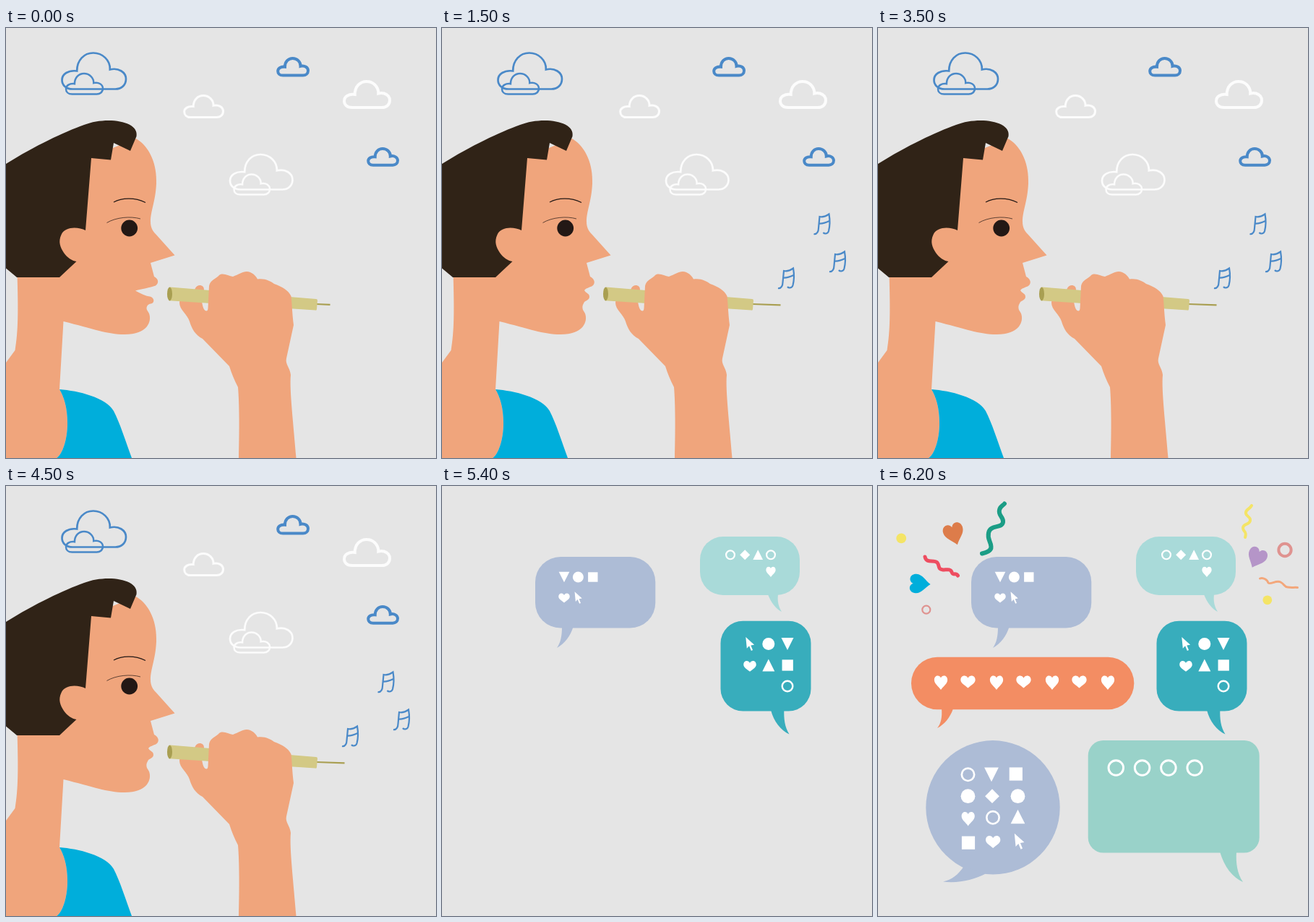
Write an HTML page with a canvas that moves like this. It is 595x595 px and loops after 6400 ms.

```html
<!DOCTYPE html>
<html lang="en">
<head>
<meta charset="utf-8">
<title>Blowing tunes and chat bubbles</title>
<style>
html, body { margin: 0; width: 100%; height: 100%; overflow: hidden; background: #e5e5e5; }
canvas { display: block; width: 595px; height: 595px; }
</style>
</head>
<body>
<canvas id="stage" width="595" height="595"></canvas>
<script>
const ctx = document.getElementById('stage').getContext('2d');
const TAU = Math.PI * 2;
const LOOP = 6400, BEAT = 500, CHAT_START = 5000, CHAT_STEP = 200;
const SKIN = '#f0a57c', HAIR = '#302317', BLUE = '#4a89c8', WHITE = '#fcfcfc';
const CYAN = '#00aedb', PIPE = '#d3c985', PIPE_DARK = '#a99f52', INK = '#231815';
const PERIWINKLE = '#adbcd6', YELLOW = '#f4e466', PINK = '#df9390';

function fill(path, color) {
  ctx.fillStyle = color;
  ctx.fill(new Path2D(path));
}

function stroke(path, color, width) {
  ctx.strokeStyle = color;
  ctx.lineWidth = width;
  ctx.stroke(path instanceof Path2D ? path : new Path2D(path));
}

function disc(x, y, r, color) {
  ctx.fillStyle = color;
  ctx.beginPath();
  ctx.arc(x, y, r, 0, TAU);
  ctx.fill();
}

function ring(x, y, outer, width, color) {
  ctx.strokeStyle = color;
  ctx.lineWidth = width;
  ctx.beginPath();
  ctx.arc(x, y, (outer - width) / 2, 0, TAU);
  ctx.stroke();
}

// Sky
const CLOUD = new Path2D('M15 50C5 50 0 44 0 37.5C0 29 9 23.500 21 25C21 10 31 0 44 0C57 0 68 10 67.500 23C80 20 90 27 90 36C90 45 83 50 75 50Z');

function cloud(x, y, w, h, color, width) {
  const outline = new Path2D();
  outline.addPath(CLOUD, new DOMMatrix([w / 90, 0, 0, h / 50, x, y]));
  stroke(outline, color, width);
}

function drawSky() {
  cloud(77.5, 34.5, 88.5, 50, BLUE, 2.7);
  cloud(83, 63, 51, 28.5, BLUE, 2.5);
  cloud(310, 175, 86.5, 48.5, WHITE, 2.7);
  cloud(315.5, 202.5, 49.5, 28, WHITE, 2.5);
  cloud(376.2, 42, 41.8, 23.5, BLUE, 4);
  cloud(501.2, 167, 40.8, 22.7, BLUE, 4);
  cloud(246.7, 93.6, 53.8, 30, WHITE, 3);
  cloud(468, 74, 63, 36, WHITE, 4);
}

// Person
const MOUTH_OPEN = 'C211 347 212 353 207 356.500C199 359.500 188 361 179 363.500C186 367 193 371 200 371.800C206 374 205.500 381 200.500 381.500C196 382 193.500 386 195 390';
const MOUTH_SHUT = 'C211 347 213 353 208 357C204 359 199 360 197 363C199 367 204 367 204 372C204 377 197 377 196 381C194 384 194 387 195 390';

function drawHead(blowing) {
  fill('M60 250L118 178L180 153C200 165 209 190 208 215C207 240 200 253 200 268C200 276 203 281 207 285L233.500 314.500L200 325L205 344' +
    (blowing ? MOUTH_SHUT : MOUTH_OPEN) +
    'L198 395C202 406 196 424 164 424C140 424 120 416 79.500 406L74 500C80 510 85 525 85 547C85 570 78 590 70 595H0V463L12.500 446C17 420 17 390 15.500 340Z', SKIN);
  fill('M74 500C100 502 138 511 149 530C157 545 166 573 174 595H70C78 590 85 570 85 547C85 525 80 510 74 500Z', CYAN);
  fill('M0 188C40 163 80 144 108 134C138 122 185 128 180.500 150L172 170L149 159L145 182.500L118 180L110 280C100 275 82 274 76.500 286C72 296 75 303 80 311C85 318 91 322 97.500 323L74 345H15L0 332.500Z', HAIR);
  disc(170.7, 277, 11.4, INK);
  stroke('M149 241C160 235 178 234 193 241.500', INK, 1.2);
  stroke('M139.500 269.500C152 262 172 260 186 264', INK, .7);
}

function drawHand(blowing) {
  fill('M241 372L256 372L262 360C265 354 274 355 274 362L271 378C272 386 274 391 277 392L280 420L254 406C251 396 240 390 240 380Z', SKIN);
  stroke(`M429 382L${blowing ? 468.5 : 448.5} ${blowing ? 383.3 : 382.9}`, PIPE_DARK, 2.2);
  fill('M227 358.500L429 375Q431 375.200 431 377L430 389Q430 391 428 390.600L226.500 377.300Z', PIPE);
  ctx.fillStyle = PIPE_DARK;
  ctx.beginPath();
  ctx.ellipse(226.5, 367.9, 3.5, 9.5, 0, 0, TAU);
  ctx.fill();
  fill('M281 357C282 349 292 346 295 342C300 338 308 343 314 344C322 341 327 337 333 337C340 337 346 343 348 347.500C358 346 366 350 371 354C382 358 391 363 394.500 371C396 385 396 395 398 411L388 457C386 465 393 470 394 480C392 500 398 550 401.500 595H322C323 560 323 520 321 497C316 487 312 478 309 468L272 430C262 425 257 416 254 406L274 390Q279 394 279.500 388Z', SKIN);
}

function drawNotes() {
  for (const [dx, dy] of [[0, 0], [21.5, 52], [-49.5, 75]]) {
    ctx.save();
    ctx.translate(dx, dy);
    stroke('M514.500 285C519 286 521 281 521 277L522.500 261C527 262 532 260 535.500 257.500C537 266 536.500 275 535 281C533.500 285.500 529 285 527.500 283M521.500 270.500C527 271 532 269 536 267', BLUE, 2.2);
    ctx.restore();
  }
}

// Icons fit a unit box centred on the origin
const ICONS = {
  square: 'M-.5-.5H.5V.5H-.5Z',
  diamond: 'M0-.5L.5 0L0 .5L-.5 0Z',
  up: 'M0-.5L.5 .5H-.5Z',
  down: 'M-.5-.5H.5L0 .5Z',
  heart: 'M0 .42C-.2 .25-.5 .1-.5-.13C-.5-.46-.13-.52 0-.26C.13-.52 .5-.46 .5-.13C.5 .1 .2 .25 0 .42Z',
  longHeart: 'M0 .55C-.18 .28-.5 .1-.5-.2C-.5-.57-.1-.62 0-.35C.1-.62 .5-.57 .5-.2C.5 .1 .18 .28 0 .55Z',
  arrow: 'M-.3-.5L-.22 .33L-.05 .15L.1 .5L.21 .45L.07 .11L.32 .06Z'
};

function icon(kind, x, y, size, color = '#fff', angle = 0) {
  if (kind === 'dot') return disc(x, y, size / 2, color);
  if (kind === 'ring') return ring(x, y, size, 1 + size / 12, color);
  ctx.save();
  ctx.translate(x, y);
  ctx.rotate(angle);
  ctx.scale(size, size);
  fill(ICONS[kind], color);
  ctx.restore();
}

function panel(x, y, w, h, r, color, tail) {
  ctx.fillStyle = color;
  ctx.beginPath();
  ctx.roundRect(x, y, w, h, r);
  ctx.fill();
  fill(tail, color);
}

const chatSteps = [
  () => {
    panel(357, 70, 138, 81, 32, '#a9dad9', 'M451 150C455 161 463 171 470 174C465 166 464 158 465 150Z');
    icon('ring', 399, 95.3, 14);
    icon('diamond', 419.2, 95.3, 14);
    icon('up', 437.2, 95.2, 13.7);
    icon('ring', 455, 95.3, 14);
    icon('longHeart', 455, 118.7, 13.3);
  },
  () => {
    panel(129, 98, 166.3, 98.5, 35, PERIWINKLE, 'M166 195C166 208 164 217 159 224C169 219 178 207 181.500 195Z');
    icon('down', 169, 126, 14.7);
    icon('dot', 188.4, 126, 15);
    icon('square', 208.8, 126, 13.4);
    icon('heart', 169, 155, 15.5);
    icon('arrow', 188.5, 154.5, 16.5);
  },
  () => {
    panel(385.5, 186.7, 125, 124.8, 31, '#38adbc', 'M455 310C459 326 469 338 480.500 343.500C474 333 473 322 473.300 310Z');
    icon('arrow', 426, 218.5, 19);
    icon('dot', 451.8, 218.5, 17);
    icon('down', 478, 218.5, 17);
    icon('heart', 426, 249.5, 17.5);
    icon('up', 451.8, 248, 17);
    icon('square', 478.2, 248, 15.3);
    icon('ring', 478, 277, 17);
  },
  () => {
    panel(46, 236.7, 308.3, 72.5, 36, '#f38d63', 'M88 308C89 320 87 329 82 335C92 330 100 320 104 308Z');
    for (let i = 0; i < 7; i++) {
      const long = i % 2 === 0;
      icon(long ? 'longHeart' : 'heart', 87 + i * 38.5 - (long ? 0 : 1), long ? 272 : 271, long ? 18.3 : 20.3);
    }
  },
  () => {
    panel(290.7, 352, 237, 155.5, 21, '#99d2c9', 'M473 506C479 527 491 542 505 548C497 536 495 522 496 506Z');
    for (let i = 0; i < 4; i++) icon('ring', 329.3 + i * 36.3, 390, 23.5);
  },
  () => {
    disc(159, 444.8, 92.7, PERIWINKLE);
    fill('M119 526C111 538 102 545 90 547.500C112 550 132 545 149 536.500Z', PERIWINKLE);
    icon('ring', 124.5, 399.3, 20);
    icon('down', 157, 399.3, 19.8);
    icon('square', 190.8, 398.5, 18.2);
    icon('dot', 124.5, 429.2, 19.8);
    icon('diamond', 158, 429.2, 19.8);
    icon('dot', 193.5, 429.2, 19.8);
    icon('longHeart', 124.7, 460.5, 18.2);
    icon('ring', 159, 458.8, 20);
    icon('up', 193.5, 457.5, 19.6);
    icon('square', 125, 493.7, 18.2);
    icon('heart', 159.2, 492.5, 20.3);
    icon('arrow', 195.4, 491.7, 22);
  },
  () => {
    disc(32.2, 72.4, 6.9, YELLOW);
    disc(538.8, 157.8, 6.4, YELLOW);
    ring(66.8, 171.2, 13.2, 2.2, PINK);
    ring(563, 88.5, 21.3, 4, PINK);
    icon('longHeart', 105.3, 66.5, 28, '#dd7c4a', -.3);
    icon('longHeart', 58, 135.2, 26.5, CYAN, -1.52);
    icon('longHeart', 523.8, 99.5, 26.5, '#b595c8', .43);
    ctx.lineCap = 'round';
    stroke('M144 93.500C150 92 157 90 156.500 84C156 76 151 74 153 65C155 53 172 59 173 50C174 43 166 41 168 33C169 28 173 27 175 24.500', '#1b9d86', 6);
    stroke('M65 98C67 108 77 101 82 106C86 111 82 115 90 116C95 116 100 114 102 119C104 125 107 119 110.500 124', '#ee4d60', 5);
    stroke('M517 27C514 33 508 32 509 38C510 43 516 42 515 48C514 54 505 52 505 58C505 64 511 62 508 71', YELLOW, 4);
    stroke('M528.500 128C533 126 539 130 540 134C543 137 551 130 557 133C563 136 562 140 567 140C572 141 576 140 580.500 140.500', '#f3a77b', 3);
    ctx.lineCap = 'butt';
  }
];

function draw(time) {
  const t = time % LOOP;
  ctx.fillStyle = '#e5e5e5';
  ctx.fillRect(0, 0, 595, 595);
  if (t < CHAT_START) {
    const blowing = Math.floor(t / BEAT) % 2 === 1;
    drawSky();
    drawHead(blowing);
    drawHand(blowing);
    if (blowing) drawNotes();
  } else {
    const shown = Math.floor((t - CHAT_START) / CHAT_STEP) + 1;
    chatSteps.slice(0, shown).forEach(step => step());
  }
}

const start = performance.now();
function tick() {
  draw(performance.now() - start);
  requestAnimationFrame(tick);
}
tick();
</script>
</body>
</html>
```
